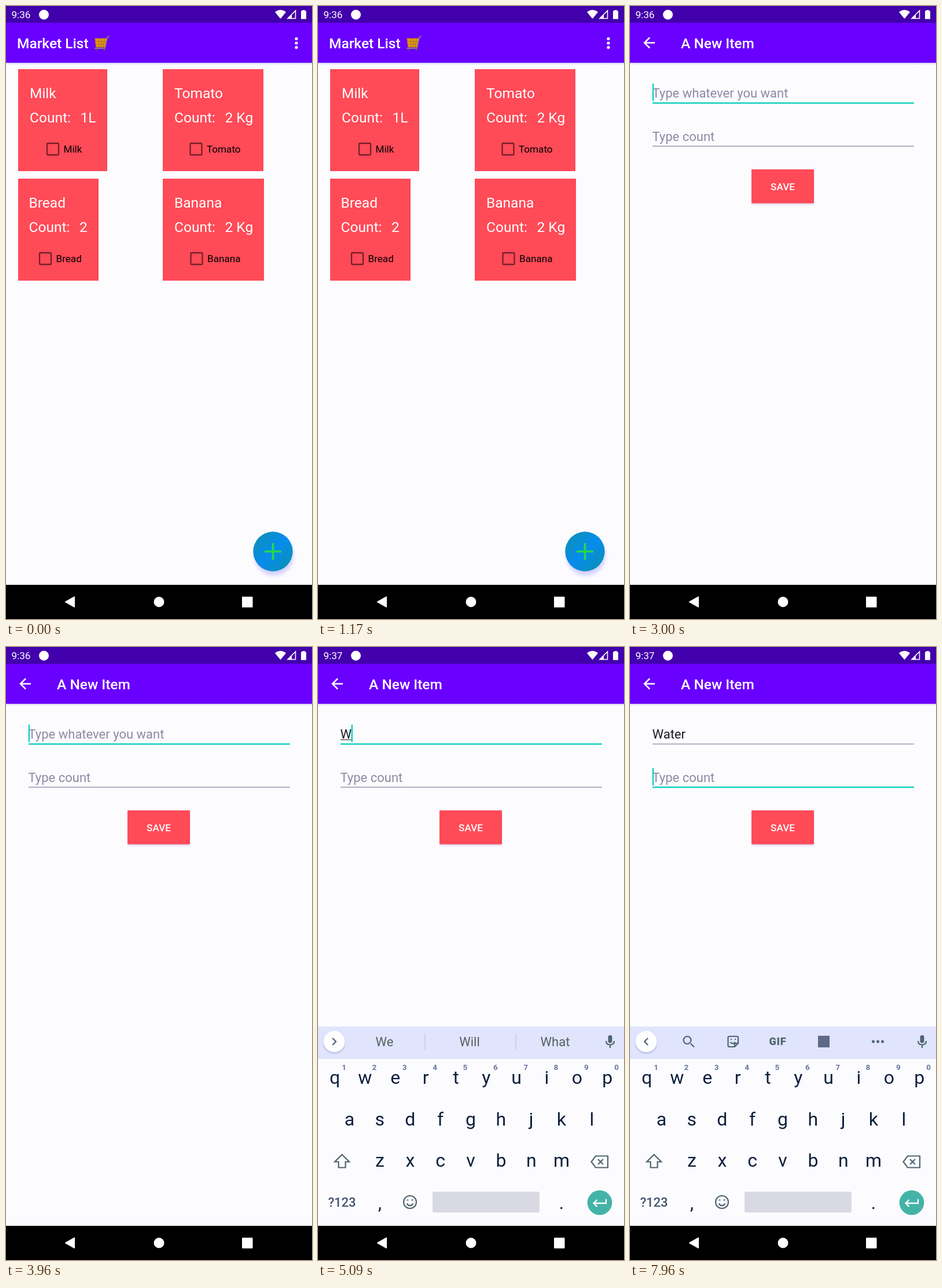
An HTML page for the animation above (8 s loop, 529 px wide and 1058 px high).

```html
<!DOCTYPE html>
<html lang="en">
<head>
<meta charset="utf-8">
<title>Market list</title>
<style>
  html, body { margin: 0; width: 100%; height: 100%; overflow: hidden; background: #fcfcff; }
  svg { display: block; width: 100%; height: 100%; font-family: Roboto, sans-serif; }
  text { white-space: pre; }
  .mid { text-anchor: middle; }
  .title { font-size: 24.5px; font-weight: 500; fill: #fff; }
  .big { font-size: 24.5px; fill: #fff; }
  .small { font-size: 17.1px; }
  .field { font-size: 22px; }
  .key { font-size: 32px; fill: #0f1f3d; text-anchor: middle; }
  .digit { font-size: 13.5px; font-weight: 700; fill: #6a76a0; text-anchor: middle; }
  .word { font-size: 22px; fill: #56605f; text-anchor: middle; }
  .line { fill: none; stroke: #4f6570; stroke-width: 2.2; }
</style>
</head>
<body>
<svg viewBox="0 0 529 1058" preserveAspectRatio="none">
  <defs>
    <linearGradient id="fabFill" x1="0" y1="0" x2="1" y2="1">
      <stop offset=".1" stop-color="#0b90b8"/>
      <stop offset=".5" stop-color="#078bee"/>
      <stop offset=".95" stop-color="#0a92ae"/>
    </linearGradient>
    <linearGradient id="barShadow" x1="0" y1="0" x2="0" y2="1">
      <stop stop-color="#d6d0ee"/>
      <stop offset="1" stop-color="#fcfcff"/>
    </linearGradient>
    <filter id="blur" x="-40%" y="-40%" width="180%" height="180%"><feGaussianBlur stdDeviation="3"/></filter>
    <filter id="softBlur" x="-40%" y="-40%" width="180%" height="180%"><feGaussianBlur stdDeviation="1.5"/></filter>
  </defs>

  <rect width="529" height="1058" fill="#fcfcff"/>
  <rect y="98" width="529" height="4" fill="url(#barShadow)"/>
  <rect y="29" width="529" height="69" fill="#6a00ff"/>

  <g id="listPage">
    <text class="title" x="19" y="73">Market List</text>
    <g fill="none" stroke-linecap="round">
      <path d="M154 56H175L171 71H156Z" fill="#f39a12" stroke="#b0701c" stroke-width="1"/>
      <path d="M155 61H173M156 66H172M160 57L161 70M165 57V70M170 57L168 70" stroke="#9a7426" stroke-width="1.2"/>
      <path d="M178 52L175 54L171 73H154" stroke="#8d7a88" stroke-width="1.8"/>
      <path d="M157 76h.1M170 76h.1" stroke="#5a4a70" stroke-width="3.4"/>
    </g>
    <g fill="#fff"><circle cx="502" cy="56.5" r="2.6"/><circle cx="502" cy="64" r="2.6"/><circle cx="502" cy="71.5" r="2.6"/></g>
    <g id="cards"></g>
    <circle cx="463" cy="949" r="34" fill="#c9c2fa" opacity=".75" filter="url(#blur)"/>
    <circle cx="461.5" cy="941.5" r="34.2" fill="url(#fabFill)"/>
    <path d="M447 941.5H476M461.5 927V956" stroke="#25d94b" stroke-width="3.6"/>
  </g>

  <g id="formPage">
    <rect y="102" width="529" height="897" fill="#fcfcff"/>
    <rect y="29" width="529" height="69" fill="#6a00ff"/>
    <path d="M43 63.5H25M34 54.5L25 63.5L34 72.5" fill="none" stroke="#fff" stroke-width="2.5"/>
    <text class="title" x="88" y="73">A New Item</text>
    <text id="itemText" class="field" x="38.5" y="158"></text>
    <rect id="composing" x="39" y="159.5" height="1.2" fill="#333"/>
    <rect id="itemLine" x="39" width="452"/>
    <text class="field" x="38.5" y="233" fill="#8f88a3">Type count</text>
    <rect id="countLine" x="39" width="452"/>
    <rect id="cursor" width="2.4" height="30" fill="#0fcfc8"/>
    <rect x="211" y="283" width="107" height="60" fill="#e2d8f2" filter="url(#softBlur)"/>
    <rect x="210" y="282" width="108" height="58.5" fill="#ff4a57"/>
    <text class="small mid" x="264" y="317.5" fill="#fff" font-weight="500">SAVE</text>
  </g>

  <rect width="529" height="29" fill="#4200ac"/>
  <text id="clock" class="small" x="9.5" y="21" fill="#fff"></text>
  <g fill="#fff">
    <circle cx="65.5" cy="15" r="8.5"/>
    <path d="M465 10.5Q474.500 3 484 10.500L474.500 22Z"/>
    <path d="M487 21.500L500.500 8V21.500Z" fill="none" stroke="#fff" stroke-width="1.6"/>
    <path d="M487 21.500L494 14.500V21.500Z"/>
    <path d="M512 7H517V8.500H519V22.500H510V8.500H512Z"/>
  </g>

  <rect y="999" width="529" height="59"/>
  <g id="keyboard">
    <rect y="655" width="529" height="344" fill="#fcfcff"/>
    <rect y="655" width="529" height="56" fill="#e0e4fd"/>
    <circle cx="28" cy="683" r="18.5" fill="#aeb4dc" filter="url(#softBlur)"/>
    <circle cx="28" cy="681" r="18.5" fill="#fff"/>
    <path id="chevron" class="line"/>
    <g id="tools">
      <path class="line" d="M105 684.500L111 690.500"/><circle class="line" cx="99" cy="678.500" r="6.500"/>
      <path class="line" d="M172 672H185Q187 672 187 674V684L181 690H172Q169.500 690 169.500 688V674Q169.500 672 172 672ZM187 684H181V690M173.500 682Q178 687 182 682M174 677h2M181 677h2"/>
      <text class="mid" x="255.500" y="686.500" font-size="18" font-weight="900" letter-spacing=".8" fill="#4f6570">GIF</text>
      <rect x="325" y="671" width="20" height="20" fill="#5f6a88"/>
      <g fill="#4f6570"><circle cx="420.500" cy="681" r="2.500"/><circle cx="428.500" cy="681" r="2.500"/><circle cx="436.500" cy="681" r="2.500"/></g>
    </g>
    <g id="words">
      <path d="M185 667V695M342 667V695" stroke="#b9c1cf"/>
      <text class="word" x="115" y="689"></text>
      <text class="word" x="262" y="689"></text>
      <text class="word" x="410" y="689"></text>
    </g>
    <rect x="501.500" y="670" width="7" height="13.500" rx="3.500" fill="#4f6570"/>
    <path class="line" d="M498 680Q498 686.500 505 686.500T512 680M505 686.500V692"/>
    <g id="keys"></g>
    <path class="line" d="M41.500 876L54 888.500H47.500V898.500H35.500V888.500H29Z"/>
    <path class="line" d="M480 878.500H501V898.500H480L472.500 888.500ZM484 884L493 893M493 884L484 893"/>
    <text class="mid" x="41.500" y="966" font-size="22" font-weight="500" fill="#43526e">?123</text>
    <text class="key" x="107" y="970" font-size="26">,</text>
    <text class="key" x="421" y="970" font-size="26">.</text>
    <circle class="line" cx="159" cy="958" r="11"/>
    <path class="line" d="M153.500 960.500Q159 968 164.500 960.500M153.500 954.500h3M161.500 954.500h3"/>
    <rect x="198" y="940" width="185" height="36" rx="3" fill="#d9d9e4"/>
    <circle cx="487" cy="959" r="21.300" fill="#43b3a8"/>
    <path d="M498 953V960H477M482.500 954L476.500 960L482.500 966" fill="none" stroke="#fff" stroke-width="2.300"/>
  </g>
  <g fill="#fff" stroke="#fff" stroke-linejoin="round" stroke-width="2">
    <path d="M103 1028.500L118 1020V1037Z"/>
    <circle cx="264.500" cy="1028.500" r="8"/>
    <rect x="409" y="1020.500" width="16.500" height="16.500"/>
  </g>
</svg>
<script>
const LOOP = 8000;
const $ = id => document.getElementById(id);
const clamp = v => Math.max(0, Math.min(1, v));
const ramp = (t, from, to) => clamp((t - from) / (to - from));
const set = (id, attrs) => {
  for (const [name, value] of Object.entries(attrs)) $(id).setAttribute(name, value);
};

function card(name, count, x, y, width, textX, boxX) {
  return `<rect x="${x}" y="${y}" width="${width}" height="176" fill="#ff4a57"/>
    <text class="big" x="${textX}" y="${y + 49.5}">${name}</text>
    <text class="big" x="${textX}" y="${y + 92}">Count:</text>
    <text class="big" x="${textX + 87.5}" y="${y + 92}">${count}</text>
    <rect x="${boxX}" y="${y + 128}" width="20" height="20" rx="1.5" fill="none" stroke="#74202c" stroke-width="2.3"/>
    <text class="small" x="${boxX + 28.5}" y="${y + 144}">${name}</text>`;
}
$('cards').innerHTML =
  card('Milk', '1L', 21, 109, 154, 41, 71) +
  card('Tomato', '2 Kg', 271, 109, 174, 291, 318.5) +
  card('Bread', '2', 21, 298, 139, 39.5, 58) +
  card('Banana', '2 Kg', 271, 298, 175, 291, 319.5);

const PITCH = 52.35;
const row = (letters, x, y) => [...letters].map((c, i) =>
  `<text class="key" x="${x + i * PITCH}" y="${y}">${c}</text>`).join('');
$('keys').innerHTML =
  row('qwertyuiop', 29, 753.5) + row('asdfghjkl', 54.5, 825.5) + row('zxcvbnm', 107, 897) +
  [...'1234567890'].map((d, i) =>
    `<text class="digit" x="${45 + i * PITCH}" y="730">${d}</text>`).join('');

// Time of each typed letter, the field's text and the words offered for it.
const typing = [
  [5000, 'W', 'We', 'Will', 'What'],
  [5250, 'Wa', 'Was', 'Want', 'Way'],
  [5500, 'Wat', 'Watch', 'What', 'Water'],
  [5750, 'Wate', 'Water', 'Late', 'Waters'],
  [6000, 'Water', 'Water', 'Later', 'Waters']
];
const FORM_FOCUS = 2660, COUNT_FOCUS = 6900, KEYBOARD_IN = 4060, KEYBOARD_SET = 4234;
const wordSlots = document.querySelectorAll('#words text');

function drawLine(id, y, focused) {
  set(id, { y: focused ? y - 1.2 : y - 0.7, height: focused ? 2.4 : 1.3, fill: focused ? '#0fcdbf' : '#8e86a8' });
}

function drawForm(t) {
  const step = typing.filter(([at]) => t >= at).pop();
  const onCount = t >= COUNT_FOCUS;
  const composing = step && !onCount;
  $('itemText').textContent = step ? step[1] : 'Type whatever you want';
  set('itemText', { fill: step ? '#1c1c22' : '#8f88a3' });
  const width = step ? $('itemText').getComputedTextLength() : 0;
  set('composing', { width: composing ? width : 0 });
  drawLine('itemLine', 167.5, !onCount);
  drawLine('countLine', 242, onCount);

  const blinkStart = onCount ? COUNT_FOCUS : step ? step[0] : FORM_FOCUS;
  const lit = t >= blinkStart && (t - blinkStart) % 1000 < 500;
  set('cursor', {
    x: composing ? 38 + width : 38.7,
    y: onCount ? 209 : 134,
    opacity: lit ? 1 : 0
  });
  return composing ? step : null;
}

function drawKeyboard(t, step) {
  const p = ramp(t, KEYBOARD_IN, KEYBOARD_SET);
  set('keyboard', { transform: `translate(0 ${185 * (1 - p) ** 2})`, opacity: p });
  const opened = step ? 0 : t < typing[0][0] ? ramp(t, 4300, 4500) : ramp(t, COUNT_FOCUS, COUNT_FOCUS + 200);
  set('tools', { opacity: opened });
  set('words', { opacity: step ? 1 : 0 });
  if (step) wordSlots.forEach((slot, i) => { slot.textContent = step[i + 2]; });
  set('chevron', { d: opened > 0.5 ? 'M31 675L25 681L31 687' : 'M25 675L31 681L25 687' });
}

function render(t) {
  const shown = ramp(t, 2700, 2840);
  set('formPage', { opacity: shown });
  set('listPage', { opacity: shown < 1 ? 1 : 0 });
  $('clock').textContent = t < 5000 ? '9:36' : '9:37';
  drawKeyboard(t, drawForm(t));
}

const start = performance.now();
function tick() {
  render((performance.now() - start) % LOOP);
  requestAnimationFrame(tick);
}
tick();
</script>
</body>
</html>
```
